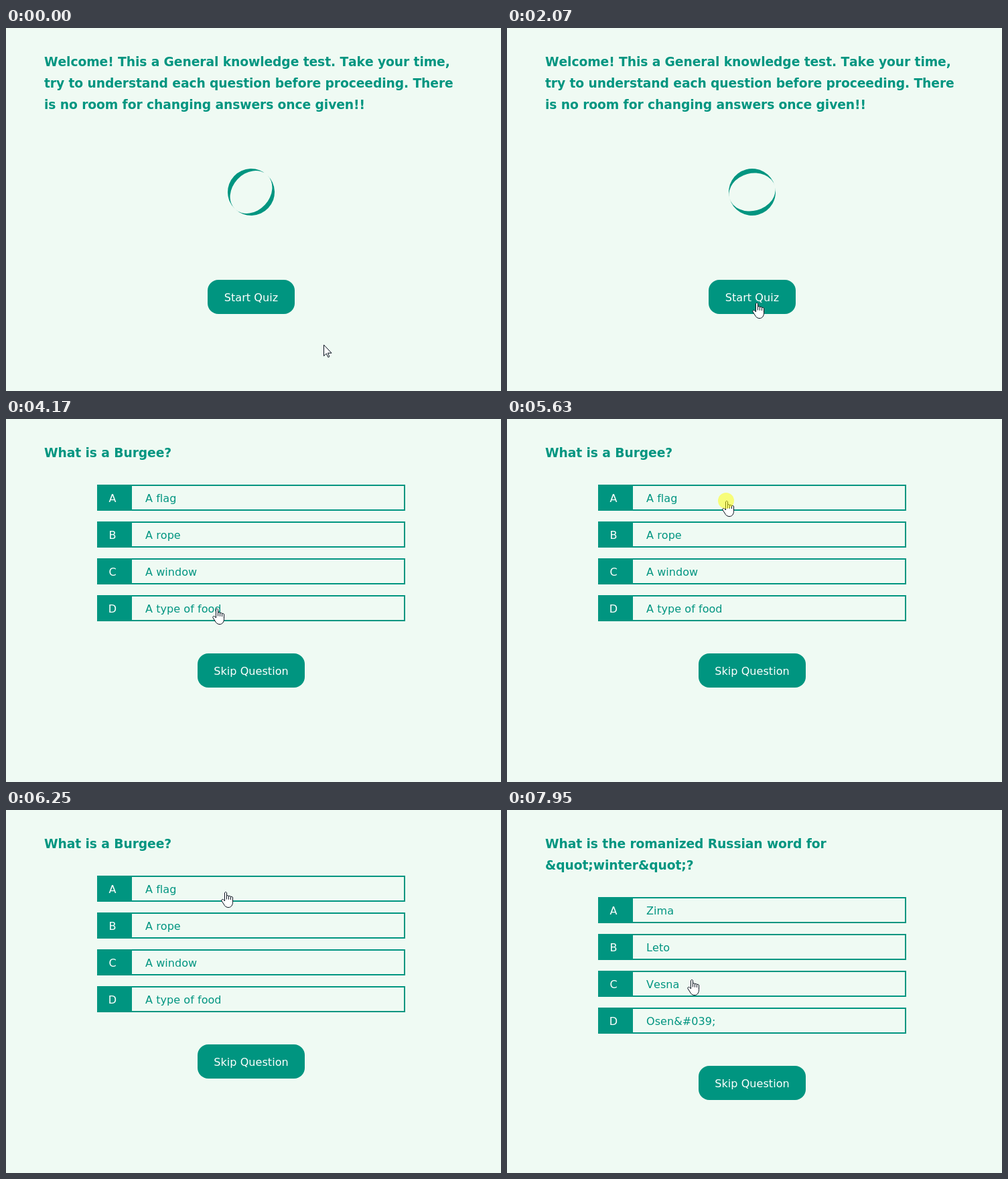
Recreate the animation shown at these times as an HTML page. Size 739x542 px, loop 8 s.

```html
<!DOCTYPE html>
<html lang="en">
<head>
<meta charset="utf-8">
<title>Quiz</title>
<style>
  html, body { margin: 0; width: 100%; height: 100%; overflow: hidden; background: #effaf3; }
  svg { display: block; width: 100%; height: 100%; }
  text { font: 16px "DejaVu Sans", sans-serif; font-kerning: none; letter-spacing: .06px; fill: #009580; white-space: pre; }
  .title { font-size: 18.72px; font-weight: bold; letter-spacing: -.095px; }
  .mid { text-anchor: middle; }
  .light { fill: #fff; }
  .teal { fill: #009580; }
  .frame { fill: none; stroke: #009580; stroke-width: 2; }
  .pen { fill: #fff; stroke: #06101c; stroke-width: 1; stroke-linejoin: round; stroke-linecap: round; }
</style>
</head>
<body>
<svg id="stage" viewBox="0 0 739 542"></svg>
<script>
const LOOP = 8000, STEP = 77.25, FIRST = 70;
const stage = document.getElementById('stage');

function add(parent, tag, attrs = {}, text) {
  const el = document.createElementNS('http://www.w3.org/2000/svg', tag);
  for (const name in attrs) el.setAttribute(name, attrs[name]);
  if (text !== undefined) el.textContent = text;
  parent.appendChild(el);
  return el;
}

function addTitle(g, lines) {
  lines.forEach((line, i) => add(g, 'text', { x: 57, y: 57 + 32 * i, class: 'title' }, line));
}

function addButton(g, label, x, y, width) {
  add(g, 'rect', { x, y, width, height: 51, rx: 16, class: 'teal' });
  add(g, 'text', { x: 366, y: y + 32, class: 'mid light' }, label);
  return { x, y, w: width, h: 51 };
}

function makeQuestion(lines, answers) {
  const g = add(stage, 'g'), fills = [], zones = [];
  const top = 66 + 32 * lines.length;
  addTitle(g, lines);
  answers.forEach((answer, i) => {
    const y = top + 55 * i;
    fills.push(add(g, 'rect', { x: 188, y: y + 2, width: 406, height: 35, fill: '#3fc05f', opacity: 0 }));
    add(g, 'rect', { x: 137, y: y + 1, width: 458, height: 37, class: 'frame' });
    add(g, 'rect', { x: 136, y, width: 52, height: 39, class: 'teal' });
    add(g, 'text', { x: 159, y: y + 26, class: 'mid light' }, 'ABCD'[i]);
    add(g, 'text', { x: 208, y: y + 26 }, answer);
    zones.push({ x: 136, y, w: 460, h: 39 });
  });
  zones.push(addButton(g, 'Skip Question', 286, top + 252, 160));
  return { g, fills, zones };
}

function makeIntro() {
  const g = add(stage, 'g');
  addTitle(g, [
    'Welcome! This a General knowledge test. Take your time,',
    'try to understand each question before proceeding. There',
    'is no room for changing answers once given!!'
  ]);
  const ring = add(g, 'path', {
    d: 'M-35 0A35 35 0 0 1 35 0A35 35 0 0 1-35 0ZM-35 0A35 28 0 0 1 35 0A35 28 0 0 1-35 0Z',
    'fill-rule': 'evenodd', class: 'teal'
  });
  return { g, ring, zones: [addButton(g, 'Start Quiz', 301, 376, 130)] };
}

const intro = makeIntro();
const burgee = makeQuestion(['What is a Burgee?'], ['A flag', 'A rope', 'A window', 'A type of food']);
const winter = makeQuestion(
  ['What is the romanized Russian word for', '&quot;winter&quot;?'],
  ['Zima', 'Leto', 'Vesna', 'Osen&#039;']
);
const screens = [intro, burgee, winter];

const cursor = add(stage, 'g');
const arrow = add(cursor, 'path', { class: 'pen', d: 'M.5 .5V16.7L4.3 13.1L6.9 18.6L8.9 17.7L6.5 12.3H11.6Z' });
const hand = add(cursor, 'path', {
  class: 'pen', transform: 'translate(-6 0)',
  d: 'M5.5 13.5V2C5.5 0 8.5 0 8.5 2V6.6C9.2 5.1 11.5 5.4 11.5 7.1C12.2 5.9 14.5 6.1 14.5 7.9' +
     'C15.2 6.9 17.5 7.1 17.5 9V15.5C17.5 20 15 23.5 11 23.5C7.5 23.5 5.5 21.3 4.4 19L1 13.8' +
     'C0 11.7 2.6 10.6 3.9 12ZM8.5 6.6V11M11.5 7.1V11.3M14.5 7.9V11.6'
});
const glow = add(cursor, 'circle', { r: 12, fill: '#ff0', 'fill-opacity': .5 });

// [time, x, y] of the pointer's hot spot
const path = [
  [100, 474, 473], [180, 477, 473], [800, 388, 354], [900, 388, 354], [1500, 372, 410],
  [3900, 372, 410], [3930, 362, 399], [4020, 362, 399], [4250, 292, 230], [4470, 335, 89],
  [4680, 335, 89], [5150, 327, 122], [7220, 327, 122], [7940, 275, 253]
];
// [time, degrees] of the ring
const spin = [[0, -47], [842, 120], [2078, 345], [3083, 525]];

const smooth = u => u * u * (3 - 2 * u);

function sample(keys, t, ease) {
  if (t <= keys[0][0]) return keys[0].slice(1);
  const i = keys.findIndex(k => k[0] > t);
  if (i < 0) return keys[keys.length - 1].slice(1);
  const a = keys[i - 1], b = keys[i];
  const u = ease((t - a[0]) / (b[0] - a[0]));
  return a.slice(1).map((v, j) => v + (b[j + 1] - v) * u);
}

const show = (el, on) => el.setAttribute('visibility', on ? 'visible' : 'hidden');
const within = (t, from, to) => t >= from && t < to;

function draw(t) {
  // The screen refreshes in coarse ticks
  const tick = Math.max(0, FIRST + STEP * Math.floor((t - FIRST) / STEP + .18));
  const active = t < 3160 ? intro : t < 6580 ? burgee : winter;
  screens.forEach(s => show(s.g, s === active));

  const [angle] = sample(spin, tick, u => u);
  intro.ring.setAttribute('transform', `translate(366 245) rotate(${angle})`);

  const flash = within(t, 5780, 6250) ? Math.sin(Math.PI * Math.min(1, (tick - 5710) / 540)) : 0;
  burgee.fills[0].setAttribute('opacity', Math.max(0, flash));

  const [x, y] = sample(path, tick, smooth).map(Math.round);
  const over = active.zones.some(z => within(x, z.x, z.x + z.w) && within(y, z.y, z.y + z.h));
  const pointing = over && !within(t, 2620, 3160);
  cursor.setAttribute('transform', `translate(${x} ${y})`);
  show(hand, pointing);
  show(arrow, !pointing);
  show(glow, within(t, 2390, 2540) || within(t, 5630, 5780));
}

const start = performance.now();
function loop() {
  draw((performance.now() - start) % LOOP);
  requestAnimationFrame(loop);
}
loop();
</script>
</body>
</html>
```
